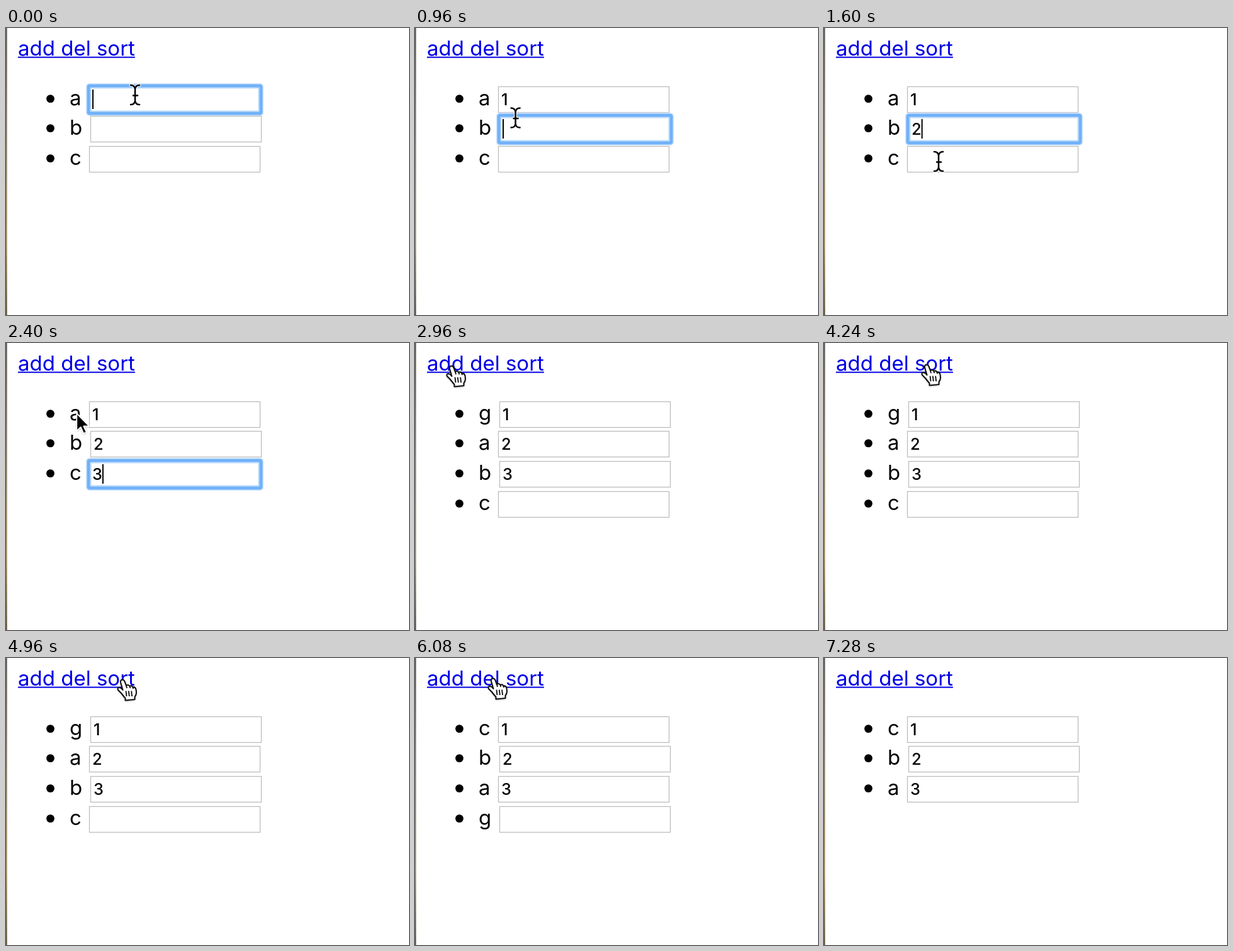
Recreate the animation shown at these times as an HTML page with a canvas. Size 640 px wide and 457 px high, loop 8560 ms.

```html
<!DOCTYPE html>
<html lang="en">
<head>
<meta charset="utf-8">
<title>List demo</title>
<style>
html, body { margin: 0; width: 100%; height: 100%; overflow: hidden; background: #fff; }
canvas { display: block; }
</style>
</head>
<body>
<canvas id="stage" width="640" height="457"></canvas>
<script>
const ctx = document.getElementById('stage').getContext('2d');
const LOOP = 8560, STEP = 80;
const ROW_H = 47.7, BOX_W = 272, BOX_H = 42;
const LABEL_FONT = '33px Inter, sans-serif';
const FIELD_FONT = '500 25.4px Inter, sans-serif';

// Pointer path: time, x, y
const path = [
  [0, 205, 106], [320, 158, 105], [640, 158, 105], [1040, 160, 152],
  [1200, 165, 147], [1280, 165, 147], [1600, 182, 212], [2080, 182, 212],
  [2640, 60, 37], [2960, 60, 37], [3280, 150, 120], [3600, 150, 246],
  [3840, 90, 200], [4240, 165, 35], [4400, 165, 35], [4640, 130, 35],
  [4960, 187, 35], [5680, 187, 35], [6080, 126, 33], [8560, 126, 33]
];

// Latest value at time t from a list of [start, value]
const at = (list, t) => list.filter(e => e[0] <= t).pop()[1];

const orders = [[0, 'abc'], [2800, 'gabc'], [5200, 'cbag'], [6320, 'cba']];
const focus = [[0, 0], [960, 1], [1760, 2], [2800, -1]];
const typed = [[0, ''], [480, '1'], [1360, '12'], [2000, '123']];

function pointerAt(t) {
  const i = Math.max(1, path.findIndex(p => p[0] >= t));
  const [t0, x0, y0] = path[i - 1], [t1, x1, y1] = path[i];
  const k = (t - t0) / (t1 - t0);
  return [x0 + (x1 - x0) * k, y0 + (y1 - y0) * k];
}

function text(str, x, y, font, color) {
  ctx.font = font;
  ctx.fillStyle = color;
  ctx.fillText(str, x, y);
  return ctx.measureText(str).width;
}

function round(x, y, w, h, r, color) {
  ctx.fillStyle = color;
  ctx.beginPath();
  ctx.roundRect(x, y, w, h, r);
  ctx.fill();
}

const boxX = label => 'bg'.includes(label) ? 134 : 132;
const rowY = i => Math.round(92.5 + i * ROW_H);

function drawRow(label, i, value, focused) {
  const x = boxX(label), y = rowY(i);
  ctx.fillStyle = '#000';
  ctx.beginPath();
  ctx.arc(70.5, y + 19.6, 6.4, 0, 7);
  ctx.fill();
  text(label, 101, y + 29.5, LABEL_FONT, '#000');

  if (focused) {
    const ring = (grow, r, color) =>
      round(x - grow, y - grow, BOX_W + 2 * grow, BOX_H + 2 * grow, r, color);
    ring(5.2, 6, '#dcecfd');
    ring(4.2, 5, '#a4cdfb');
    ring(3, 4, '#70b1f8');
    ring(-1.2, 1, '#a9d0fa');
    ring(-2.6, 1, '#d9ebfd');
    ring(-4, 0, '#fff');
  } else {
    ctx.strokeStyle = '#b9b9b9';
    ctx.lineWidth = 1.2;
    ctx.strokeRect(x + .5, y + .5, BOX_W - 1, BOX_H - 1);
  }
  const w = text(value, x + 5, y + 30.3, FIELD_FONT, '#000');
  if (focused) {
    ctx.fillStyle = '#000';
    ctx.fillRect(x + 5 + w, y + 5, 2, 31);
  }
}

function outline(points, fill, stroke, width) {
  const shape = new Path2D('M' + points + 'Z');
  ctx.lineJoin = 'round';
  ctx.save();
  ctx.shadowColor = 'rgba(0,0,0,.35)';
  ctx.shadowBlur = 3;
  ctx.shadowOffsetY = 1.5;
  ctx.fillStyle = fill;
  ctx.fill(shape);
  ctx.restore();
  ctx.strokeStyle = stroke;
  ctx.lineWidth = width;
  ctx.stroke(shape);
}

const cursors = {
  beam() {
    const p = new Path2D('M-7-15Q-1-15 0-9Q1-15 7-15M0-10V10M-7 16Q-1 16 0 10Q1 16 7 16M-3 1.5H4');
    ctx.lineCap = 'round';
    for (const [color, width] of [['rgba(255,255,255,.8)', 5], ['#000', 2.5]]) {
      ctx.strokeStyle = color;
      ctx.lineWidth = width;
      ctx.stroke(p);
    }
  },
  hand() {
    outline('-5 4Q-5.5 0-2.5-.5Q.5-.5 1.5 2.5L4 9Q7 6.5 9.5 10Q12.5 8 14.5 11.5' +
      'Q18 10.5 19.5 15L20 20Q20 24 17.5 27V31L2.5 32.5V29' +
      'Q-1 25-4 21L-9 16Q-11 12-6.5 12Q-4 12.5-1.5 16Z', '#fff', '#111', 2.1);
    ctx.lineWidth = 1.9;
    ctx.stroke(new Path2D('M4 9L5 13M9.5 10L10.3 13M14.5 11.5L15 14'));
    ctx.stroke(new Path2D('M3.5 17.5L4.5 26M7.8 17.5L8.8 26M12.1 17.5L13.1 26'));
  },
  arrow() {
    outline('0 0V28L6.5 22L11 32L15.5 30L11 20.5H20Z', '#000', '#fff', 1.8);
  }
};

function cursorKind(x, y, labels) {
  if (y < 48 && x > 18 && x < 205) return 'hand';
  const onField = [...labels].some((label, i) =>
    x > boxX(label) && x < boxX(label) + BOX_W && y > rowY(i) && y < rowY(i) + BOX_H);
  return onField ? 'beam' : 'arrow';
}

function draw(t) {
  ctx.fillStyle = '#fff';
  ctx.fillRect(0, 0, 640, 457);
  const edge = ctx.createLinearGradient(0, 0, 0, 457);
  edge.addColorStop(0, '#5d5a56');
  edge.addColorStop(.4, '#8d7d68');
  edge.addColorStop(.75, '#a08a5c');
  edge.addColorStop(1, '#5f5038');
  ctx.fillStyle = edge;
  ctx.fillRect(0, 0, 1.7, 457);

  const w = text('add del sort', 19, 43.8, LABEL_FONT, '#0000e6');
  ctx.fillRect(19, 45.6, w, 2);

  const labels = at(orders, t), values = at(typed, t), active = at(focus, t);
  [...labels].forEach((label, i) => drawRow(label, i, values[i] || '', i === active));

  const hidden = (t >= 2000 && t < 2160) || t >= 6720;
  if (hidden) return;
  const [x, y] = pointerAt(t);
  ctx.save();
  ctx.translate(x, y);
  cursors[cursorKind(x, y, labels)]();
  ctx.restore();
}

const start = performance.now();
function frame() {
  const t = (performance.now() - start) % LOOP;
  draw(Math.floor(t / STEP) * STEP);
  requestAnimationFrame(frame);
}
frame();
</script>
</body>
</html>
```
